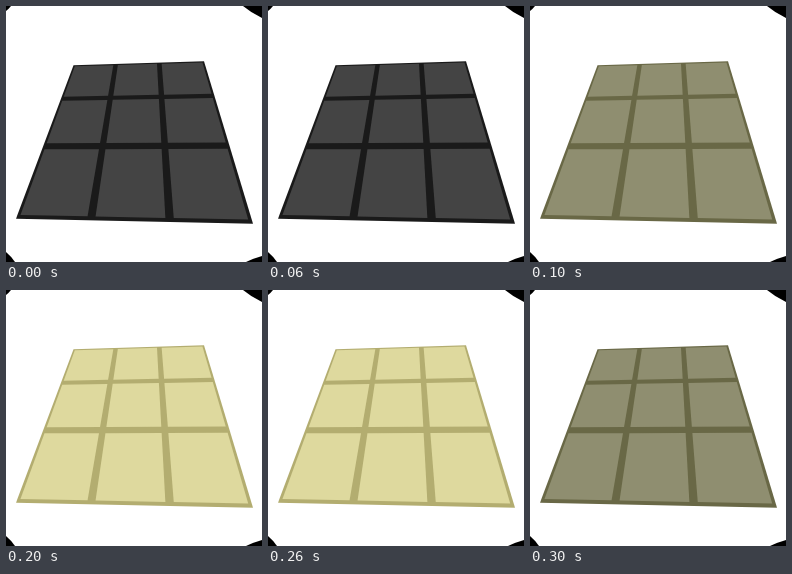
Animation of 256 by 256 pixels, one loop 0.4 s. Source, as an HTML page with a canvas:

```html
<!DOCTYPE html>
<html lang="en">
<head>
<meta charset="utf-8">
<title>Glowing floor panel</title>
<style>
  html, body { margin: 0; width: 100%; height: 100%; overflow: hidden; background: #fff; }
  canvas { display: block; width: 256px; height: 256px; }
</style>
</head>
<body>
<canvas id="stage" width="256" height="256"></canvas>
<script>
const ctx = document.getElementById('stage').getContext('2d');
const SIZE = 256;
const STEP = 100;
const DARK = { tile: '#444444', grout: '#1a1a1a' };
const HALF = { tile: '#8f8e70', grout: '#696846' };
const LIT = { tile: '#ded99e', grout: '#b3ad70' };
const CYCLE = [DARK, HALF, LIT, HALF];

// Panel corners, clockwise from the top left
const QUAD = [[67.5, 59.2], [198, 55.2], [247, 217.8], [10, 212.7]];
const RIM = 0.014;
const GAP = 0.0175;

// Black corners of the stage: position, then reach along x and y
const CORNERS = [
  [0, 0, 5, 5],
  [SIZE, 0, -19, 12],
  [SIZE, SIZE, -16, -6],
  [0, SIZE, 9, -10]
];
const BULGE = 0.57;

// Perspective map from the unit square to a quad
function perspective([[x0, y0], [x1, y1], [x2, y2], [x3, y3]]) {
  const ax = x1 - x2, ay = y1 - y2;
  const bx = x3 - x2, by = y3 - y2;
  const sx = x0 - x1 + x2 - x3, sy = y0 - y1 + y2 - y3;
  const det = ax * by - bx * ay;
  const g = (sx * by - bx * sy) / det;
  const h = (ax * sy - sx * ay) / det;
  return (u, v) => {
    const w = 1 + g * u + h * v;
    return [
      (x0 + (x1 - x0 + g * x1) * u + (x3 - x0 + h * x3) * v) / w,
      (y0 + (y1 - y0 + g * y1) * u + (y3 - y0 + h * y3) * v) / w
    ];
  };
}

const project = perspective(QUAD);

function fillRect(u0, v0, u1, v1, color) {
  ctx.fillStyle = color;
  ctx.beginPath();
  for (const [u, v] of [[u0, v0], [u1, v0], [u1, v1], [u0, v1]]) {
    ctx.lineTo(...project(u, v));
  }
  ctx.fill();
}

function fillCorner(x, y, dx, dy) {
  ctx.beginPath();
  ctx.moveTo(x, y);
  ctx.lineTo(x + dx, y);
  ctx.quadraticCurveTo(x + dx * BULGE, y + dy * BULGE, x, y + dy);
  ctx.fill();
}

// Start and end of tile i along one side of the panel
function span(i) {
  return [
    i === 0 ? RIM : i / 3 + GAP,
    i === 2 ? 1 - RIM : (i + 1) / 3 - GAP
  ];
}

function draw(time) {
  const { tile, grout } = CYCLE[Math.floor(time / STEP) % CYCLE.length];
  ctx.fillStyle = '#fff';
  ctx.fillRect(0, 0, SIZE, SIZE);

  ctx.fillStyle = '#000';
  for (const corner of CORNERS) fillCorner(...corner);

  fillRect(0, 0, 1, 1, grout);
  for (let row = 0; row < 3; row++) {
    const [v0, v1] = span(row);
    for (let col = 0; col < 3; col++) {
      const [u0, u1] = span(col);
      fillRect(u0, v0, u1, v1, tile);
    }
  }
}

const start = performance.now();
function loop() {
  draw(performance.now() - start);
  requestAnimationFrame(loop);
}
loop();
</script>
</body>
</html>
```
